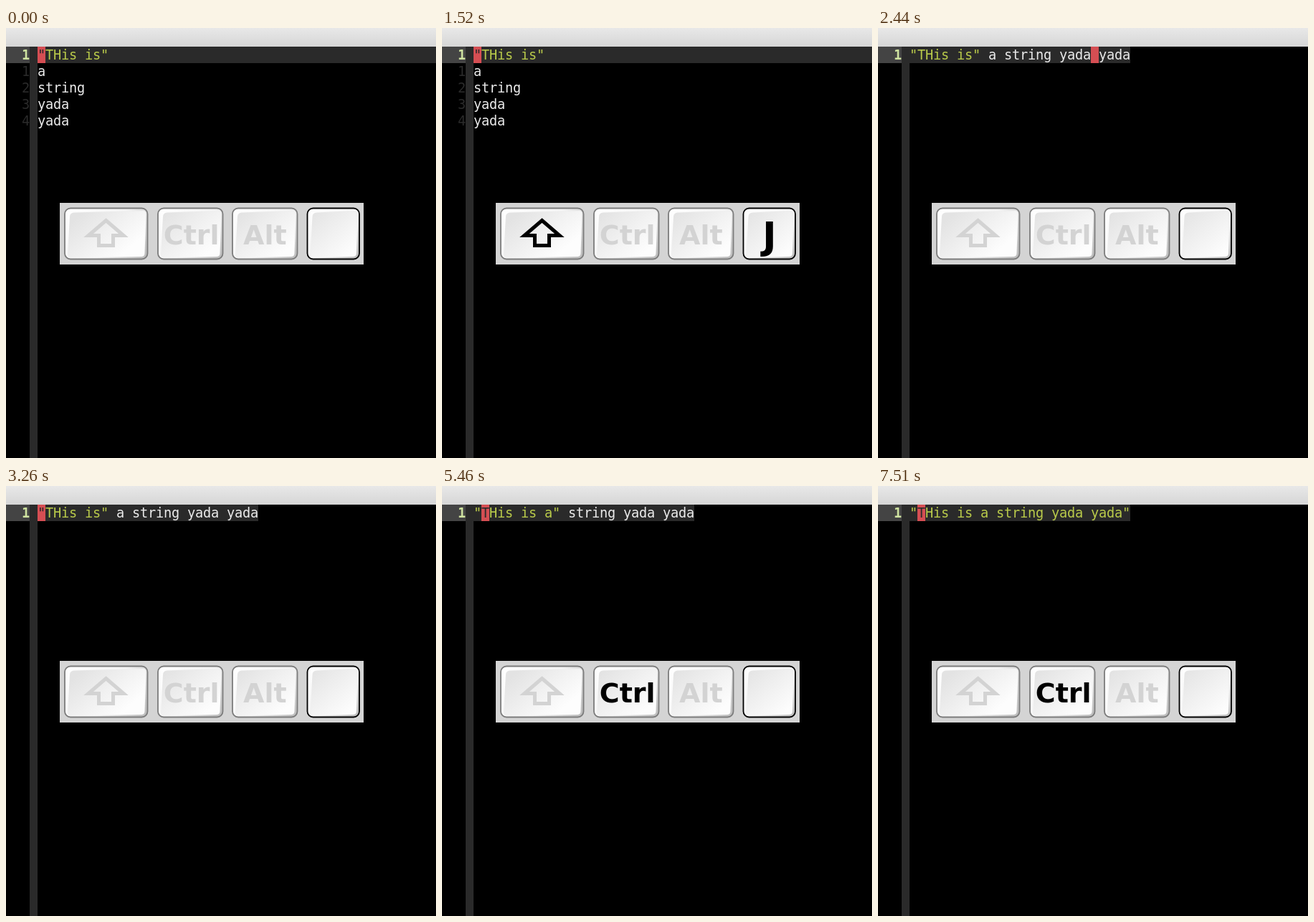
An HTML page with a canvas that plays this animation: 600 px wide and 600 px high, repeating every 7.88 s.

```html
<!DOCTYPE html>
<html lang="en">
<head>
<meta charset="utf-8">
<title>Joining and slurping</title>
<style>
html, body { margin: 0; width: 100%; height: 100%; overflow: hidden; background: #000; }
canvas { display: block; }
</style>
</head>
<body>
<canvas id="stage" width="600" height="600"></canvas>
<script>
const ctx = document.getElementById('stage').getContext('2d');
const LOOP = 7880;
const CELL = 11, ROW = 23, LEFT = 44, TOP = 26;
const MONO = '18.667px "DejaVu Sans Mono", monospace';
const SANS = '"DejaVu Sans", sans-serif';
const GREEN = '#b9ca4a', WHITE = '#eaeaea', RED = '#d54e53', DARK = '#2a2a2a';
const FADED = '#d3d3d3';

// [label, shown from, shown until]
const presses = [
  ['5', 800, 1360], ['J', 1520, 2080], ['0', 2650, 3260], ['L', 3620, 4150],
  ['→', 4830, 5460], ['→', 5500, 6140], ['→', 6230, 6800], ['→', 6900, 7510]
];
const words = ['a', 'string', 'yada', 'yada'];
const slurps = [4870, 5540, 6230, 6940];
const JOIN = 1560;

const between = (t, from, to) => t >= from && t < to;

function box(x, y, w, h, fill) {
  ctx.fillStyle = fill;
  ctx.fillRect(x, y, w, h);
}

function cells(text, x, row, color, font = MONO) {
  ctx.font = font;
  ctx.fillStyle = color;
  [...text].forEach((c, i) => ctx.fillText(c, x + i * CELL, TOP + 18 + row * ROW));
}

function cursorColumn(t) {
  if (t < JOIN) return 0;
  if (t < 2690) return 23;
  return t < 3660 ? 0 : 1;
}

function drawEditor(t) {
  const joined = t >= JOIN;
  const inside = slurps.filter(s => t >= s).length;
  const quoted = '"' + ['THis is', ...words.slice(0, inside)].join(' ') + '"';
  const rest = words.slice(inside).map(w => ' ' + w).join('');
  const line = joined ? quoted + rest : quoted;

  box(0, 0, 600, 600, '#000');
  const bar = ctx.createLinearGradient(0, 0, 0, TOP);
  bar.addColorStop(0, '#e8e8e8');
  bar.addColorStop(1, '#d6d6d6');
  box(0, 0, 600, TOP, bar);

  box(0, TOP, 33, ROW, '#444');
  box(33, TOP, CELL, 600 - TOP, DARK);
  box(LEFT, TOP, joined ? line.length * CELL : 600 - LEFT, ROW, DARK);
  cells('1', 22, 0, '#cfe3a0', 'bold ' + MONO);

  cells(quoted, LEFT, 0, GREEN);
  if (joined) {
    cells(rest, LEFT + quoted.length * CELL, 0, WHITE);
  } else {
    words.forEach((w, i) => {
      cells(String(i + 1), 22, i + 1, DARK);
      cells(w, LEFT, i + 1, WHITE);
    });
  }

  const col = cursorColumn(t);
  const x = LEFT + col * CELL;
  box(x, TOP, CELL, ROW, RED);
  cells(line[col], x, 0, DARK);
}

function drawKey(x, w, border) {
  const y = 251.5, h = 71, r = x + w, b = y + h;
  ctx.beginPath();
  ctx.roundRect(x, y, w, h, 8);
  const rim = ctx.createLinearGradient(x, y, r, b);
  rim.addColorStop(0, '#fff');
  rim.addColorStop(0.55, '#f4f4f4');
  rim.addColorStop(1, '#b8b8b8');
  ctx.fillStyle = rim;
  ctx.fill();
  ctx.lineWidth = 1.8;
  ctx.strokeStyle = border;
  ctx.stroke();

  // slightly skewed face
  const face = ctx.createLinearGradient(x + w / 2 - 30, y + 4, x + w / 2 + 22, b - 6);
  face.addColorStop(0, '#e3e3e3');
  face.addColorStop(1, '#fdfdfd');
  ctx.beginPath();
  ctx.moveTo(x + 7, y + 12);
  ctx.quadraticCurveTo(x + 7, y + 6.5, x + 13, y + 6);
  ctx.lineTo(r - 6, y + 3.5);
  ctx.quadraticCurveTo(r - 2, y + 3.5, r - 2, y + 8);
  ctx.lineTo(r - 4, b - 8);
  ctx.quadraticCurveTo(r - 4, b - 4, r - 8, b - 3.5);
  ctx.lineTo(x + 8, b - 2);
  ctx.quadraticCurveTo(x + 4, b - 2, x + 4, b - 7);
  ctx.closePath();
  ctx.fillStyle = face;
  ctx.fill();
}

function drawShift(color) {
  ctx.beginPath();
  ctx.moveTo(139.5, 268.5);
  ctx.lineTo(164, 289.5);
  ctx.lineTo(149.5, 289.5);
  ctx.lineTo(149.5, 303.5);
  ctx.lineTo(129.5, 303.5);
  ctx.lineTo(129.5, 289.5);
  ctx.lineTo(115, 289.5);
  ctx.closePath();
  ctx.lineWidth = 5;
  ctx.strokeStyle = color;
  ctx.stroke();
}

function label(text, x, y, size, color) {
  ctx.font = `bold ${size}px ${SANS}`;
  ctx.fillStyle = color;
  ctx.fillText(text, x, y);
}

function drawKeys(t) {
  const ink = on => on ? '#000' : FADED;
  box(75, 244, 424, 86, '#d4d4d4');
  drawKey(82, 115.5, '#7c7c7c');
  drawKey(212, 90.5, '#7c7c7c');
  drawKey(316, 90.5, '#7c7c7c');
  drawKey(420.5, 72.5, '#000');

  drawShift(ink(between(t, 1160, 2440)));
  label('Ctrl', 219.8, 302, 38, ink(t >= 4000));
  label('Alt', 331, 302, 38, FADED);

  const press = presses.find(([, from, to]) => between(t, from, to));
  if (press) {
    ctx.textAlign = 'center';
    label(press[0], 457, 308, 52, '#000');
    ctx.textAlign = 'left';
  }
}

const start = performance.now();
function frame() {
  const t = (performance.now() - start) % LOOP;
  drawEditor(t);
  drawKeys(t);
  requestAnimationFrame(frame);
}
frame();
</script>
</body>
</html>
```
